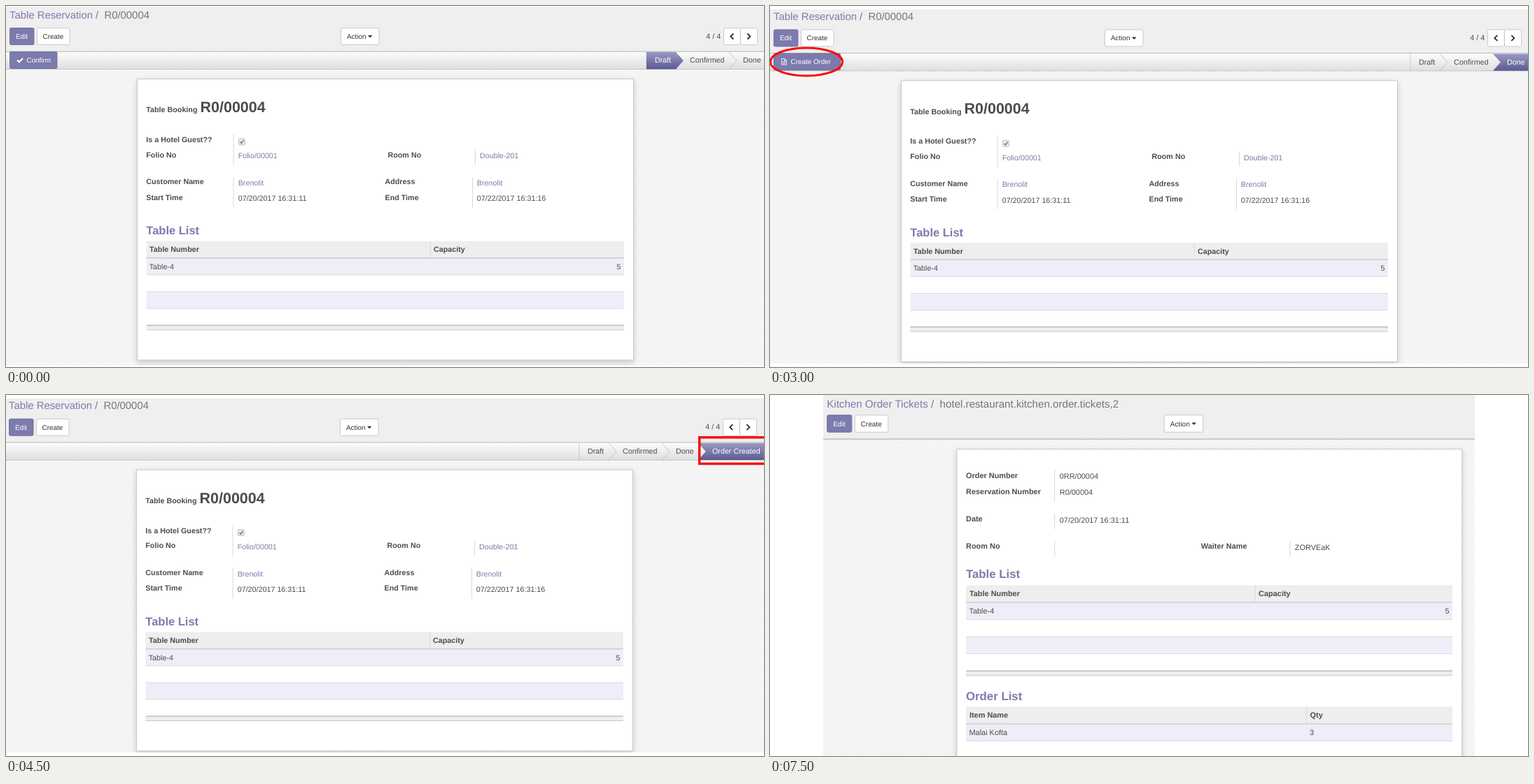
Recreate the animation shown at these times as an HTML page. Size 1083 by 517 pixels, loop 8000 ms.

```html
<!DOCTYPE html>
<html lang="en">
<head>
<meta charset="utf-8">
<title>Table booking steps</title>
<style>
  html, body { margin: 0; width: 100%; height: 100%; overflow: hidden; background: #fff; }
  svg { display: block; width: 1083px; height: 517px; }
  text { font-family: "Liberation Sans", Arial, sans-serif; text-rendering: geometricPrecision; }
  .sheet { filter: drop-shadow(0 3px 4px rgba(0, 0, 0, .18)); }
</style>
</head>
<body>
<svg id="stage" viewBox="0 0 1083 517">
  <defs>
    <linearGradient id="bar" x2="0" y2="1"><stop stop-color="#fcfcfc"/><stop offset="1" stop-color="#dedede"/></linearGradient>
    <linearGradient id="active" x2="0" y2="1"><stop stop-color="#9a99c4"/><stop offset="1" stop-color="#5b5a92"/></linearGradient>
    <pattern id="weave" width="3.3" height="3.3" patternUnits="userSpaceOnUse">
      <rect width="3.3" height="3.3" fill="#fbfbfb"/>
      <path d="M0 0h1.65v3.3h1.65v-1.65h-3.3z" fill="#eee"/>
    </pattern>
  </defs>
</svg>
<script>
const PURPLE = '#7c7bad', DARK = '#4c4c4c', RED = '#f80d0d';
const BODY = 10.74, SMALL = 9.9;

// y is the middle of the capitals
const text = (x, y, str, { size = BODY, fill = DARK, bold, end } = {}) =>
  `<text x="${x}" y="${y + size * 0.355}" font-size="${size}" fill="${fill}"` +
  `${bold ? ' font-weight="700"' : ''}${end ? ' text-anchor="end"' : ''}>${str}</text>`;
const rect = (x, y, w, h, fill, extra = '') =>
  `<rect x="${x}" y="${y}" width="${w}" height="${h}" fill="${fill}" ${extra}/>`;
const line = (d, color, width = 1) =>
  `<path d="${d}" fill="none" stroke="${color}" stroke-width="${width}"/>`;
const heading = (y, str) => text(200.3, y, str, { size: 16.5, fill: PURPLE, bold: true });

const icons = {
  check: line('M1 5l2.8 2.8L9 2.5', '#fff', 2.2),
  square: line('M7 1.5H1.2V8.8H8V6', '#fff', 1.1) + line('M3 4.2l2 2L9.6 1.8', '#fff', 1.7),
  cross: line('M2.5 2.5l5 5M7.5 2.5l-5 5', '#fff', 2.2),
  file: line('M1.8 .7h4l2.6 2.6v6H1.8zM5.6 .7v2.8h2.8M3.4 5.3h3.4M3.4 7.2h3.4', '#fff', 0.9),
  arrow: line('M.8 5h7.5M5 1.6L8.4 5L5 8.4', '#fff', 1.9)
};

function button(x, y, w, label, tx, primary) {
  const style = primary ? [PURPLE, '#6d6ca1', '#fff'] : ['#fff', '#c6c6c6', '#333'];
  return rect(x + 0.5, y + 0.5, w - 1, 24, style[0], `stroke="${style[1]}" stroke-width=".9" rx="1.8"`) +
    text(tx, y + 12.5, label, { size: SMALL, fill: style[2] });
}

function header({ crumb, name, titleY = 12.5 }) {
  const title = `${crumb}<tspan fill="#777">\u00a0/\u00a0\u00a0${name}</tspan>`;
  return rect(-5, -5, 1100, 70, '#f0eeee') + line('M-5 65.3H1095', '#b2b2b2', 1.1) +
    text(5, titleY, title, { size: 14.87, fill: PURPLE }) +
    button(5, 31, 35.5, 'Edit', 14, true) +
    button(44, 31, 47.5, 'Create', 52.5) +
    button(478, 31, 55.5, 'Action', 487) + '<path d="M517 42h6.5l-3.25 3.5z" fill="#333"/>' +
    text(1000.3, 42.8, '4 / 4') +
    button(1025, 31, 24.7, '', 0) + button(1049, 31, 25, '', 0) +
    line('M1039.3 39.5l-4 4l4 4M1059.3 39.5l4 4l-4 4', '#333', 1.9);
}

// stages: [label, text x]; each one starts behind the tip of the one before
function statusBar({ buttons, stages, active }) {
  const start = i => i ? stages[i][1] - 20 : stages[0][1] - 12;
  let out = rect(-5, 66, 1100, 24.5, 'url(#bar)') + line('M-5 90.5H1095', '#c4c4c4') +
    line(`M${start(0)} 66v24.5`, '#c8c8c8');
  stages.forEach(([label, x], i) => {
    const a = start(i), b = i + 1 < stages.length ? start(i + 1) : 1100;
    const on = i === active;
    if (on) out += `<path d="M${a} 66H${b}l11 12.2L${b} 90.4H${a}${i ? 'l11 -12.2' : ''}z" fill="url(#active)"/>`;
    else if (b < 1100) out += line(`M${b} 66l11 12.2l-11 12.2`, '#c4c4c4');
    out += text(x, 77.3, label, { fill: on ? '#fff' : DARK });
  });
  for (const [x, w, label, icon, iconX = x + 10] of buttons)
    out += button(x, 65, w, label, x + 24.5, true) +
      `<g transform="translate(${iconX} 72.4)">${icons[icon]}</g>`;
  return out;
}

const sheet = (y, h) => rect(187.5, y + 0.5, 709, h, '#fff', 'class="sheet" stroke="#c8c8d3"');
const rule = (x, top, bottom) => line(`M${x} ${top}V${bottom}`, '#d9d9d9');

function field(x, y, label, vx, value, link, drop = 1.5) {
  return text(x, y, label, { bold: true }) + text(vx, y + drop, value, { fill: link ? PURPLE : DARK });
}

// cols: [header, left edge, value, right edge of value when right aligned]
function table(y, cols) {
  const x = 200.5, w = 682.5, row = 24.1;
  let out = rect(x, y, w, row, '#eee');
  for (const n of [1, 3]) out += rect(x, y + n * row, w, row, '#eeeef8');
  for (const n of [2, 3, 4]) out += line(`M${x} ${y + n * row}h${w}`, '#dadade');
  out += line(`M${x} ${y + row}h${w}`, '#cfcfcf', 1.6);
  out += rect(x, y + 5 * row, w, 6.5, '#eee') + line(`M${x} ${y + 5 * row}h${w}`, '#c2c2c2', 1.7) +
    line(`M${x} ${y + 5 * row + 6.5}h${w}`, '#c6c6c6');
  cols.forEach(([label, left, value, right], i) => {
    if (i) out += line(`M${left} ${y}v${row - 1}`, '#d9d9d9');
    out += text(left + 4.6, y + 11.6, label, { bold: true }) +
      text(right || left + 4.2, y + 36.2, value, { end: right });
  });
  return out;
}

const seats = [['Table Number', 200.5, 'Table-4'], ['Capacity', 606.4, '5', 878.6]];
const ellipse = `<ellipse cx="52" cy="77.5" rx="51.5" ry="20" fill="none" stroke="${RED}" stroke-width="3"/>`;
const frame = (x, y, w, h) => rect(x, y, w, h, 'none', `stroke="${RED}" stroke-width="3.5"`);
const docTitle = (label, x, name) =>
  text(200.3, 148.4, label, { bold: true }) + text(x, 144.4, name, { size: 21.45, bold: true });

const booking = sheet(104, 402.5) + docTitle('Table Booking', 277.6, 'R0/00004') +
  text(200.3, 191, 'Is a Hotel Guest??', { bold: true }) +
  rect(332.5, 190, 8.8, 8.8, '#ececec', 'stroke="#bdbdbd" rx="1.5"') +
  line('M334.6 194.5l1.8 2l3.2 -4.4', '#777', 1.5) +
  rule(325, 183.5, 228) + rule(670.5, 205.5, 228) + rule(325, 245, 289) + rule(666.5, 245, 289) +
  field(200.3, 212.9, 'Folio No', 331.7, 'Folio/00001', true) +
  field(545.5, 212.9, 'Room No', 677, 'Double-201', true) +
  field(200.3, 251.6, 'Customer Name', 331.7, 'Brenolit', true) +
  field(541.5, 251.6, 'Address', 672.8, 'Brenolit', true) +
  field(200.3, 273.9, 'Start Time', 331.7, '07/20/2017 16:31:11') +
  field(541.5, 273.9, 'End Time', 672.8, '07/22/2017 16:31:16') +
  heading(321.5, 'Table List') + table(336.8, seats);

const order = sheet(104, 500) + docTitle('Order', 233.8, '0RR/00004') +
  rule(324.7, 183.5, 209) + rule(662.5, 183.5, 209) + rule(324.7, 225.5, 250.5) + rule(666, 225.5, 250.5) +
  field(200.3, 194.5, 'Reservation No', 331.7, 'R0/00004', true) +
  field(539.1, 194.5, 'Folio No', 670.4, 'Folio/00001', true) +
  field(200.3, 233.2, 'Date', 331.7, '07/20/2017 16:31:11') +
  field(542.2, 233.2, 'Waiter Name', 673.6, 'ZORVEaK', true) +
  heading(275.8, 'Table List') + table(291.3, seats) +
  heading(446.6, 'Order List') +
  table(462.3, [['Item Name', 200.5, 'Malai Kofta'], ['Qty', 443.2, '3'],
    ['Rate', 547.5, '85.00', 678.5], ['Subtotal', 682.9, '255.00', 878.4]]);

const ticket = sheet(78.9, 500) +
  rule(324.8, 108.4, 153.5) + rule(324.8, 169.7, 191.8) + rule(324.8, 208.5, 231.1) + rule(655, 208.5, 231.1) +
  field(200.3, 116.2, 'Order Number', 331.7, '0RR/00004') +
  field(200.3, 138.7, 'Reservation Number', 331.7, 'R0/00004') +
  field(200.3, 177.2, 'Date', 331.7, '07/20/2017 16:31:11', false, 1.8) +
  text(200.3, 215.9, 'Room No', { bold: true }) +
  field(530.2, 215.9, 'Waiter Name', 661.8, 'ZORVEaK') +
  heading(255.2, 'Table List') + table(270.9, seats) +
  heading(426.2, 'Order List') +
  table(441.8, [['Item Name', 200.5, 'Malai Kofta'], ['Qty', 678.5, '3']]);

const reservation = { crumb: 'Table Reservation', name: 'R0/00004', body: booking };
const threeStages = [['Draft', 927], ['Confirmed', 977], ['Done', 1053]];

// view: [x, y, scale]; crop: [left, top, right, bottom]
const scenes = [
  { ...reservation, view: [0, 0, 1], crop: [0, 1, 1083, 515],
    stages: threeStages, active: 0, buttons: [[5, 68.5, 'Confirm', 'check']] },
  { ...reservation, view: [0, 0, 1.0012], crop: [0, 1, 1083, 515],
    stages: threeStages, active: 1,
    buttons: [[5, 57, 'Done', 'square'], [65.5, 65, 'Cancel', 'cross', 76]] },
  { ...reservation, view: [0, 2.4, 1], crop: [0, 5, 1083, 512],
    stages: threeStages, active: 2, buttons: [[5, 96, 'Create Order', 'file']], mark: ellipse },
  { ...reservation, view: [-1, 2.7, 1], crop: [0, 5, 1083, 512],
    stages: [['Draft', 832], ['Confirmed', 882], ['Done', 958], ['Order Created', 1010]],
    active: 3, buttons: [], mark: frame(991.7, 58, 110, 37.7) },
  { crumb: 'Generate Order', name: '0RR/00004', titleY: 16, body: order, shift: -6.4,
    view: [20.1, -4.9, 0.974], crop: [19, 0, 1065, 517],
    stages: [['Draft', 895.2], ['Order Created', 944.4], ['Done', 1040]], active: 1,
    buttons: [[5, 97, 'Generate KOT', 'arrow'], [106.7, 57.5, 'Done', 'check']],
    mark: frame(6.8, 62, 96.1, 32.4) },
  { crumb: 'Kitchen Order Tickets', name: 'hotel.restaurant.kitchen.order.tickets,2', titleY: 16,
    body: ticket, view: [76.1, -3.3, 1.018], crop: [76, 0, 1007, 517] }
];

function draw(scene, i) {
  const [x, y, k] = scene.view, [l, t, r, b] = scene.crop;
  return `<clipPath id="crop${i}">${rect(l, t, r - l, b - t, '#000')}</clipPath>` +
    `<g class="scene" clip-path="url(#crop${i})" display="none">` +
    `<g transform="translate(${x} ${y}) scale(${k})">` +
    rect(-5, 60, 1100, 480, 'url(#weave)') +
    `<g transform="translate(${scene.shift || 0} 0)">${scene.body}</g>` +
    header(scene) + (scene.stages ? statusBar(scene) : '') + (scene.mark || '') + '</g></g>';
}

const stage = document.getElementById('stage');
stage.insertAdjacentHTML('beforeend', scenes.map(draw).join(''));
const layers = [...stage.querySelectorAll('.scene')];

function tick() {
  const now = Math.floor(performance.now() % 8000 / 1500);
  layers.forEach((layer, i) => layer.setAttribute('display', i === now ? 'inline' : 'none'));
  requestAnimationFrame(tick);
}
tick();
</script>
</body>
</html>
```
